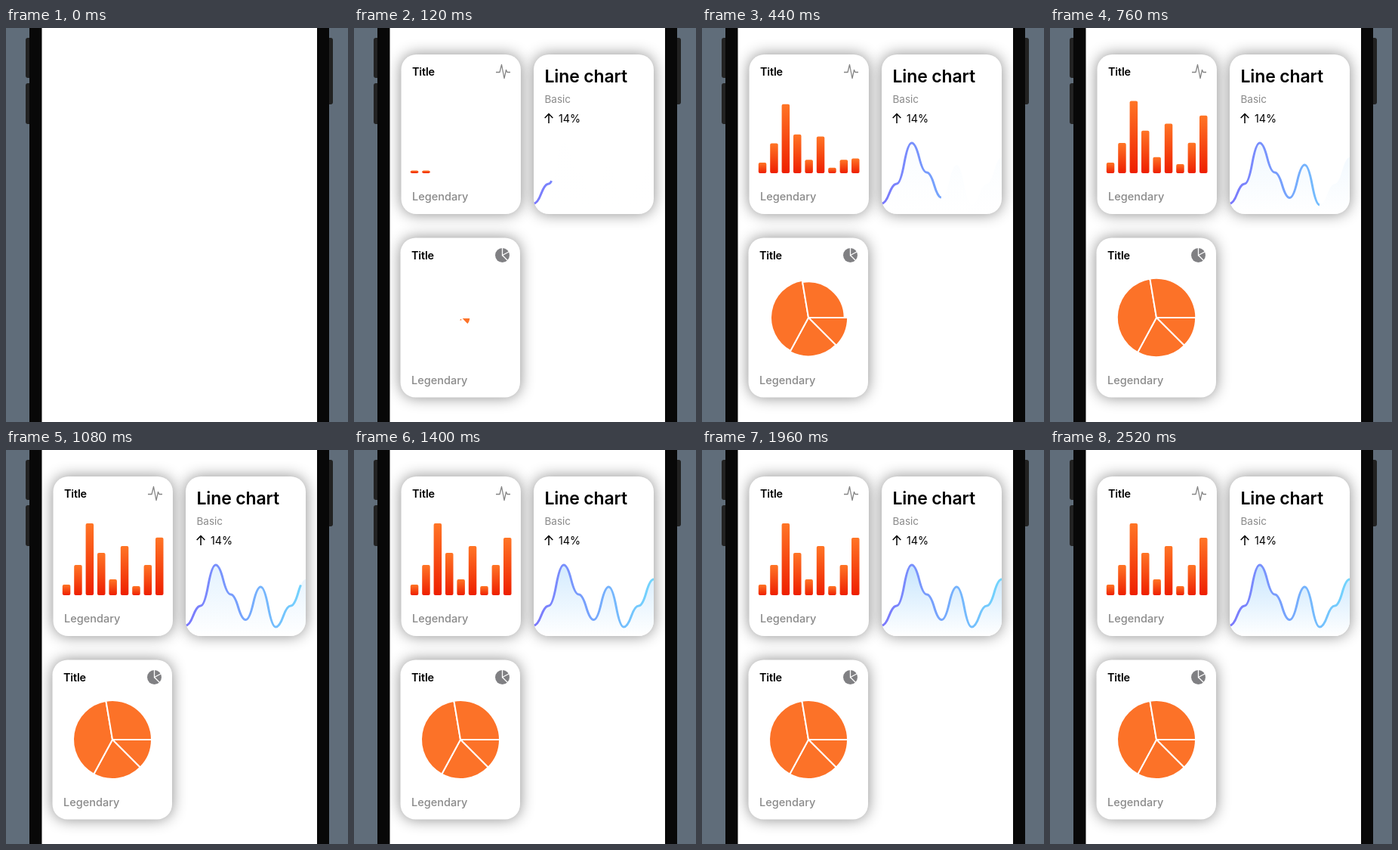
Animation, 453 px wide and 521 px high, one loop 2.56 s. Source, as an HTML page:

```html
<!DOCTYPE html>
<html lang="en">
<head>
<meta charset="utf-8">
<title>Chart cards</title>
<style>
  html, body { margin: 0; width: 100%; height: 100%; overflow: hidden; background: #606d7a; }
  svg { display: block; width: 453px; height: 521px; font-family: Inter, sans-serif; }
  .card { fill: #fff; filter: drop-shadow(0 0 9.5px #8b8b8b); }
  .title { font-size: 14.4px; font-weight: 600; letter-spacing: -.01em; }
  .legend { font-size: 14.5px; font-weight: 500; fill: #8a8a8a; }
  .line { fill: none; }
</style>
</head>
<body>
<svg viewBox="0 0 453 521">
  <defs>
    <linearGradient id="fire" x2="0" y2="1">
      <stop stop-color="#ff7526"/><stop offset="1" stop-color="#ee1f00"/>
    </linearGradient>
    <linearGradient id="cool" gradientUnits="userSpaceOnUse" x1="238" x2="397">
      <stop stop-color="#7b78fc"/><stop offset="1" stop-color="#72d6fd"/>
    </linearGradient>
    <linearGradient id="sky" gradientUnits="userSpaceOnUse" x1="0" x2="0" y1="142" y2="246">
      <stop stop-color="#c0e2fd"/><stop offset="1" stop-color="#fff"/>
    </linearGradient>
    <clipPath id="lineCard"><rect x="238" y="35" width="159" height="211" rx="20"/></clipPath>
  </defs>

  <rect x="47" width="366" height="521" fill="#fff"/>

  <g id="cards">
    <rect class="card" x="62.5" y="35" width="158.5" height="211" rx="20"/>
    <rect class="card" x="238" y="35" width="159" height="211" rx="20"/>
    <rect class="card" x="61.5" y="277.5" width="158.5" height="211" rx="20"/>

    <text class="title" x="77" y="63">Title</text>
    <path class="line" stroke="#858585" stroke-width="1.3" stroke-linejoin="round"
      d="M188 58.5H193L195.5 48.5L199 66.5L201.5 55.5L203 58.5H207"/>
    <g id="bars" fill="url(#fire)"></g>
    <text class="legend" x="77" y="228">Legendary</text>

    <text x="252.5" y="72" font-size="23" font-weight="600" letter-spacing="-.15">Line chart</text>
    <text x="252.5" y="99" font-size="13.5" fill="#8a8a8a">Basic</text>
    <path class="line" stroke="#000" stroke-width="1.5" d="M258 126V113.5M252.7 119L258 113.5L263.3 119"/>
    <text x="271" y="125" font-size="14.3">14%</text>
    <g clip-path="url(#lineCard)">
      <path id="area" fill="url(#sky)"/>
      <path id="curve" class="line" stroke="url(#cool)" stroke-width="3" stroke-linejoin="round" pathLength="1"/>
    </g>

    <text class="title" x="76" y="306">Title</text>
    <circle cx="196.5" cy="300.5" r="9.5" fill="#808083"/>
    <path class="line" stroke="#fff" stroke-width="1.3" d="M196.5 290V300.5L206 295.5M196.5 300.5L204 308"/>
    <g id="pie" fill="#fc7228" stroke="#fff" stroke-width="2"></g>
    <text class="legend" x="76" y="470.5">Legendary</text>
  </g>

  <g fill="#222">
    <rect x="26" y="13" width="9" height="53" rx="3"/>
    <rect x="26" y="73" width="9" height="54" rx="3"/>
    <rect x="424" y="13" width="9" height="88" rx="3"/>
  </g>
  <path fill="#080808" d="M31 0H47.5V521H31ZM412 0H428V521H412Z"/>
</svg>
<script>
const LOOP = 2560, SHOW = 80, START = 40, STAGGER = 40;
const $ = id => document.getElementById(id);
const clamp = v => Math.min(1, Math.max(0, v));

const barHeights = [14, 40, 95, 56, 21, 65, 12, 40, 76];
const sliceAngles = [0, 45, 118.5, 260.5, 360];
const levels = [232, 206, 152, 191, 224.5, 181, 234, 206, 171];

// Damped spring: response 0.55 s, damping ratio 0.825
function spring(ms) {
  if (ms <= 0) return 0;
  const s = ms / 1000, w = 2 * Math.PI / 0.55, z = 0.825, damped = w * Math.sqrt(1 - z * z);
  return 1 - Math.exp(-z * w * s) * (Math.cos(damped * s) + z * w / damped * Math.sin(damped * s));
}

// cubic-bezier(0, 0, .58, 1), solved by bisection
function easeOut(x) {
  if (x <= 0 || x >= 1) return clamp(x);
  const bezier = (b, c) => 3 * (1 - b) * b * b * c + b ** 3;
  let lo = 0, hi = 1;
  for (let i = 0; i < 24; i++) {
    const mid = (lo + hi) / 2;
    if (bezier(mid, .58) < x) lo = mid; else hi = mid;
  }
  return bezier(lo, 1);
}
const easeIn = x => 1 - easeOut(1 - x);

// Two quadratic halves per step keep the curve flat at every data point
function smoothPath(values, x, step) {
  let d = `M${x} ${values[0]}`;
  for (let i = 1; i < values.length; i++, x += step) {
    const a = values[i - 1], b = values[i];
    d += `Q${x + step / 4} ${a} ${x + step / 2} ${(a + b) / 2}Q${x + step * .75} ${b} ${x + step} ${b}`;
  }
  return d;
}

function slicePath(from, to, r) {
  const point = deg => {
    const a = deg * Math.PI / 180;
    return `${141 + r * Math.cos(a)} ${383 + r * Math.sin(a)}`;
  };
  return `M141 383L${point(from)}A${r} ${r} 0 0 1 ${point(to)}Z`;
}

const curve = smoothPath(levels, 238, 159 / 8);
$('curve').setAttribute('d', curve);
$('area').setAttribute('d', curve + 'V246H238Z');
$('bars').innerHTML = barHeights.map((_, i) => `<rect x="${74.8 + i * 15.4}" width="10.5" rx="2"/>`).join('');
$('pie').innerHTML = '<path/>'.repeat(sliceAngles.length - 1);
const bars = [...$('bars').children], slices = [...$('pie').children];

function draw(t) {
  $('cards').style.display = t < SHOW ? 'none' : '';
  const age = t - START, grow = i => spring(age - i * STAGGER);
  bars.forEach((bar, i) => {
    const h = barHeights[i] * grow(i);
    bar.setAttribute('y', 192 - h);
    bar.setAttribute('height', h);
  });
  slices.forEach((slice, i) =>
    slice.setAttribute('d', slicePath(sliceAngles[i], sliceAngles[i + 1], 52 * grow(i))));
  $('curve').setAttribute('stroke-dasharray', `${easeOut(age / 1200)} 2`);
  $('area').setAttribute('opacity', easeIn(age / 1600));
}

const begin = performance.now();
function tick() {
  draw((performance.now() - begin) % LOOP);
  requestAnimationFrame(tick);
}
tick();
</script>
</body>
</html>
```
